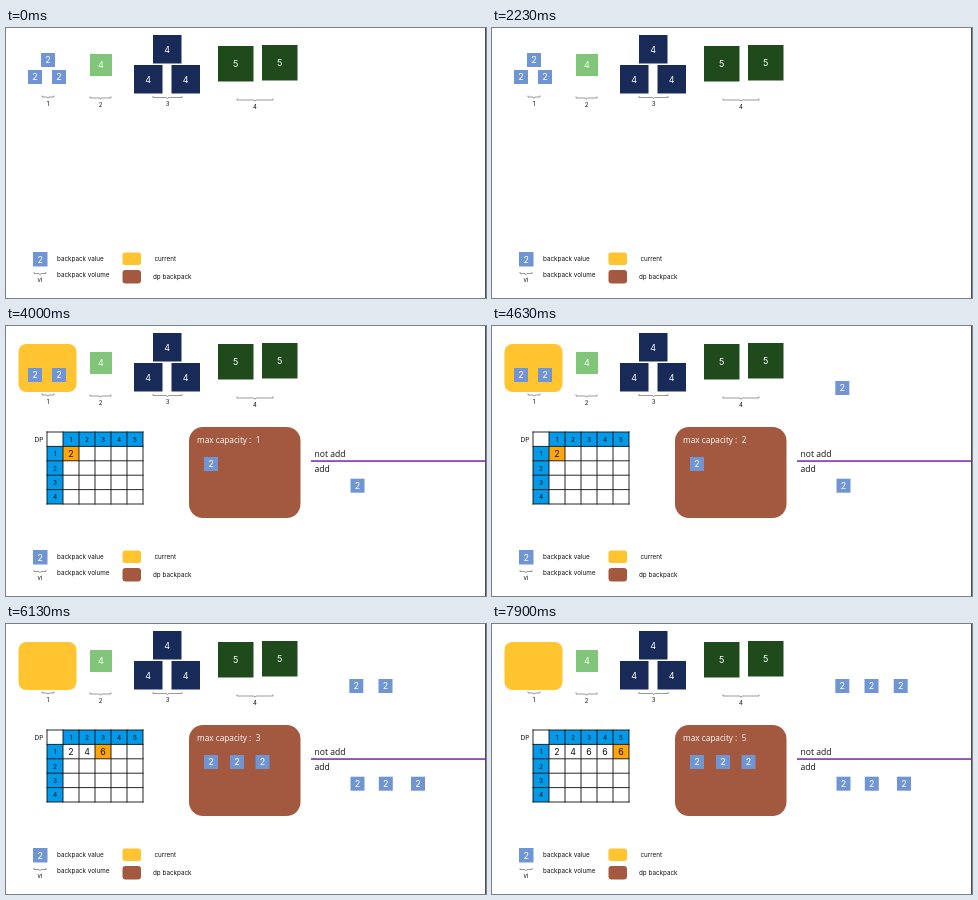
Recreate the animation shown at these times as an HTML page. Size 480 by 270 pixels, loop 8 s.

```html
<!DOCTYPE html>
<html lang="en">
<head>
<meta charset="utf-8">
<style>
html, body { margin: 0; width: 100%; height: 100%; overflow: hidden; background: #fff; }
svg { display: block; width: 100vw; height: 100vh; }
text { font-family: Inter, "Open Sans", sans-serif; }
.board { font-family: "Open Sans", "Noto Sans", sans-serif; }
</style>
</head>
<body>
<svg id="stage" viewBox="0 0 480 270"></svg>
<script>
const NS = 'http://www.w3.org/2000/svg';
const stage = document.getElementById('stage');
const LOOP = 8000;
const SKY = '#7095d4', LIME = '#80c579', NAVY = '#182b58', FOREST = '#1f4a1b';
const YELLOW = '#ffc42f', BROWN = '#a2593f', HEAD = '#039be9', ORANGE = '#ffa60d';

function add(tag, attrs, parent = stage) {
  const el = document.createElementNS(NS, tag);
  for (const k in attrs) el.setAttribute(k, attrs[k]);
  parent.appendChild(el);
  return el;
}
const group = () => add('g', {});
const rect = (x, y, width, height, fill, rx = 0, parent) =>
  add('rect', { x, y, width, height, fill, rx }, parent);

function label(str, x, y, size, parent, extra = {}) {
  const el = add('text', { x, y, 'font-size': size, fill: '#111', ...extra }, parent);
  el.textContent = str;
  return el;
}
const middle = { 'text-anchor': 'middle' };

function block(x, y, size, value, fill, parent) {
  const g = add('g', {}, parent);
  rect(x, y, size, size, fill, 0, g);
  label(value, x + size / 2, y + size / 2 + 3.3, 9, g, { ...middle, fill: '#fff' });
  return g;
}
function bracket(x, y, w, text, textY) {
  const m = x + w / 2;
  add('path', {
    d: `M${x} ${y - 1.5}v1.5H${m - 1}l1 1.3l1-1.3H${x + w}v-1.5`,
    fill: 'none', stroke: '#555', 'stroke-width': 0.6
  });
  label(text, m, textY, 6, stage, middle);
}
const show = (el, on) => el.setAttribute('visibility', on ? 'visible' : 'hidden');

// Items and legend
const current = rect(12.5, 18, 58, 48, YELLOW, 8);
const supply = [[35, 25], [46, 42], [22, 42]].map(([x, y]) => block(x, y, 14, 2, SKY));
block(84, 26, 22, 4, LIME);
[[147, 7], [128, 37], [165.5, 37]].forEach(([x, y]) => block(x, y, 28.5, 4, NAVY));
block(212, 18, 35.5, 5, FOREST);
block(256, 17, 35.5, 5, FOREST);
bracket(36, 69, 12, 1, 77.5);
bracket(84, 70, 21, 2, 79);
bracket(147, 69.5, 29, 3, 78);
bracket(231, 72, 36, 4, 81);

block(27, 224, 14.5, 2, SKY);
bracket(28, 245.5, 12, 'vi', 254);
rect(116.5, 224.5, 18.5, 12.5, YELLOW, 2.5);
rect(116.5, 242, 18.5, 13.5, BROWN, 3);
label('backpack value', 51, 232.5, 6.3);
label('backpack volume', 51, 248.5, 6.3);
label('current', 148.5, 232.5, 6.3);
label('dp backpack', 147, 250.5, 6.3);
rect(479.2, 0, 0.8, 270, '#222');

// Table
const table = group();
const CW = 16, CH = 14.4, TX = 41, TY = 106;
label('DP', 28.5, 116, 6.5, table);
rect(TX + CW, TY, CW * 5, CH, HEAD, 0, table);
rect(TX, TY + CH, CW, CH * 4, HEAD, 0, table);
const cursor = rect(TX, TY + CH, CW, CH, ORANGE, 0, table);
let grid = '';
for (let c = 0; c <= 6; c++) grid += `M${TX + c * CW} ${TY}v${CH * 5}`;
for (let r = 0; r <= 5; r++) grid += `M${TX} ${TY + r * CH}h${CW * 6}`;
add('path', { d: grid, stroke: '#111', 'stroke-width': 0.9, 'stroke-linecap': 'square' }, table);
for (let i = 1; i <= 5; i++) {
  label(i, TX + (i + 0.5) * CW, TY + 9.8, 6.5, table, middle);
  if (i < 5) label(i, TX + CW / 2, TY + i * CH + 9.8, 6.5, table, middle);
}
const results = [2, 4, 6, 6, 6].map((v, i) =>
  label(v, TX + (i + 1.5) * CW, TY + CH + 10.4, 8.8, stage, middle));

// Backpack and comparison board
const pack = group();
rect(183, 101, 111.5, 91, BROWN, 14, pack);
const white = { fill: '#fff', class: 'board' };
label('max capacity :', 191, 117, 8.25, pack, white);
const capacity = label('', 249.8, 117, 8.25, pack, white);

const board = group();
rect(305, 134.3, 175, 1.5, '#7c22ac', 0, board);
label('not add', 308.5, 131, 8.6, board, { class: 'board' });
label('add', 308.5, 146, 8.6, board, { class: 'board' });

const row = (xs, y) => xs.map(x => block(x, y, 14, 2, SKY));
const packed = row([198, 224, 249.5], 131);
const skipped = row([343.3, 372.5, 401.7], 55);
const added = row([344.5, 372.8, 405], 152.7);

// Start of each capacity step; its parts follow one after another
const STEPS = [3450, 4400, 5400, 6300, 7230];
const reached = (t, delay) => STEPS.filter(s => t >= s + delay).length;
const showFirst = (list, n) => list.forEach((el, i) => show(el, i < n));

function render(t) {
  show(table, t >= 2320);
  show(pack, t >= 2400);
  show(board, t >= 2470);
  show(current, t >= 3400);

  const cap = reached(t, 0), done = reached(t, 400);
  capacity.textContent = cap || '';
  showFirst(skipped, reached(t, 130) - 1);
  showFirst(added, reached(t, 250));
  showFirst(packed, done);
  supply.forEach((el, i) => show(el, i >= done));
  showFirst(results, done);
  cursor.setAttribute('x', TX + done * CW);
  cursor.setAttribute('visibility', done ? 'inherit' : 'hidden');
}

const start = performance.now();
function frame() {
  render((performance.now() - start) % LOOP);
  requestAnimationFrame(frame);
}
render(0);
requestAnimationFrame(frame);
</script>
</body>
</html>
```
